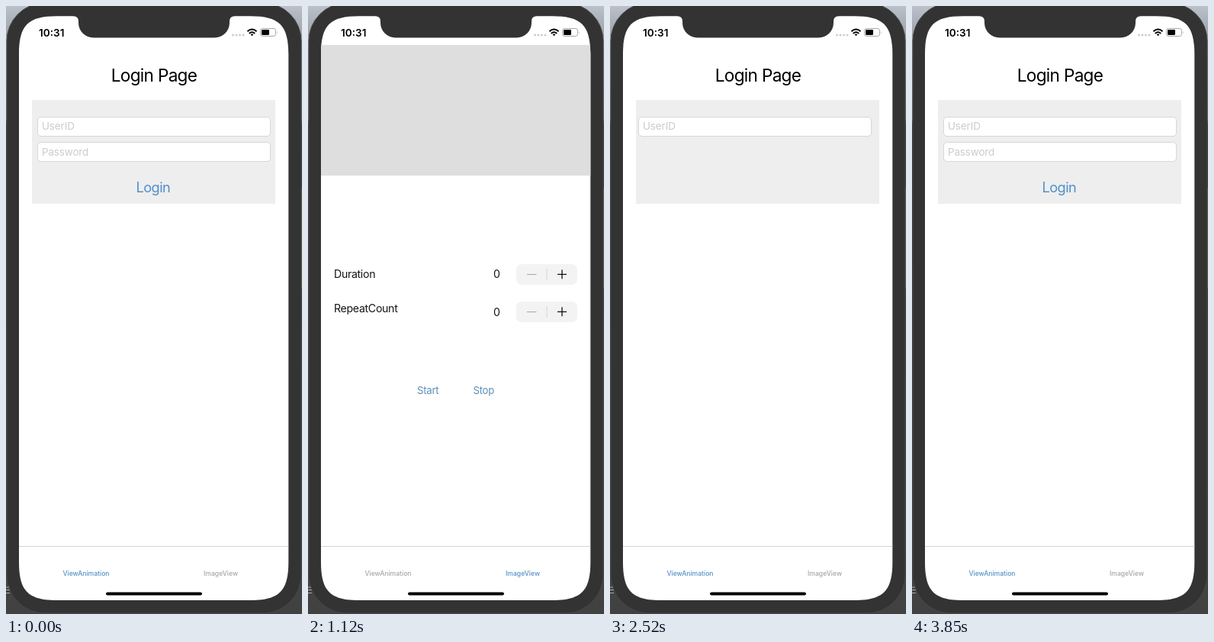
Write an HTML page that moves like this. It is 388 by 796 pixels and loops after 3.92 s.

```html
<!DOCTYPE html>
<html lang="en">
<head>
<meta charset="utf-8">
<title>Login page and tab animation</title>
<style>
  html, body { margin: 0; width: 100%; height: 100%; overflow: hidden; background: #3a3a3a; }
  svg { display: block; width: 388px; height: 796px; }
  text { font-family: Inter, Roboto, "Liberation Sans", sans-serif; }
  .title { font-size: 22.6px; letter-spacing: -.031em; text-anchor: middle; }
  .hint { font-size: 13.4px; letter-spacing: -.008em; fill: #cbcbcd; }
  .field rect { fill: #fff; stroke: #d6d6d6; }
  .login { font-size: 18.2px; letter-spacing: -.033em; fill: #4f8fcc; }
  .label { font-size: 14.2px; letter-spacing: -.024em; fill: #151515; }
  .button { font-size: 13.2px; letter-spacing: -.02em; fill: #5a8fb8; }
  .tab { font-size: 8.6px; font-weight: 500; text-anchor: middle; }
  .clock { font-size: 13.6px; font-weight: 600; }
</style>
</head>
<body>
<svg viewBox="0 0 388 796">
  <defs>
    <linearGradient id="desk" x2="0" y2="1">
      <stop offset="0" stop-color="#bac1ca"/>
      <stop offset=".06" stop-color="#989ca2"/>
      <stop offset=".185" stop-color="#85888c"/>
      <stop offset=".195" stop-color="#3c3c3c"/>
      <stop offset=".8" stop-color="#4a4a4a"/>
      <stop offset="1" stop-color="#414141"/>
    </linearGradient>
    <path id="glass" d="M67 13.300H88Q95 13.300 95 20V22A19.500 19.500 0 0 0 114.500 41.500H273.500A19.500 19.500 0 0 0 293 22V20Q293 13.300 300 13.300H320C358 13.300 370.300 25 370.300 63V728C370.300 766 358 778 320 778H67C29 778 17 766 17 728V63C17 25 29 13.300 67 13.300Z"/>
    <clipPath id="screen"><use href="#glass"/></clipPath>
    <g id="stepper">
      <rect x="273" width="80" height="27" rx="7" fill="#f3f3f4"/>
      <path d="M287 13.500h12.500" stroke="#a6a6a6" stroke-width="1.2"/>
      <path d="M313 6v15" stroke="#d6d6d8"/>
      <path d="M327 13.300h12M333 7.300v12" stroke="#111" stroke-width="1.3"/>
    </g>
  </defs>

  <!-- desktop and phone body -->
  <rect width="388" height="796" fill="url(#desk)"/>
  <rect x="386" y="238" width="2" height="132" fill="#6f7551"/>
  <rect x="1" y="-4" width="386" height="799" rx="50" fill="#333" stroke="#484848"/>
  <path d="M0 761h4M0 764.500h5M0 768.500h5" stroke="#aaa"/>
  <use href="#glass" fill="#fff"/>

  <g clip-path="url(#screen)">
    <g id="loginPage">
      <text class="title" x="194" y="99">Login Page</text>
      <rect x="34" y="123" width="319" height="136" fill="#eee"/>
      <g id="user" class="field">
        <rect x="41.500" y="145.500" width="305" height="25" rx="4.500"/>
        <text class="hint" x="47" y="162">UserID</text>
      </g>
      <g id="pass" class="field">
        <rect x="41.500" y="178.500" width="305" height="25" rx="4.500"/>
        <text class="hint" x="47" y="195.500">Password</text>
      </g>
      <text id="login" class="login" x="170.600" y="244">Login</text>
    </g>

    <g id="imagePage">
      <rect x="17" y="51" width="354" height="171" fill="#dedede"/>
      <g class="label">
        <text x="34" y="356">Duration</text>
        <text x="34" y="401">RepeatCount</text>
        <text x="243" y="356">0</text>
        <text x="243" y="406">0</text>
      </g>
      <use href="#stepper" y="338"/>
      <use href="#stepper" y="387"/>
      <text class="button" x="143" y="508">Start</text>
      <text class="button" x="216.500" y="508">Stop</text>
    </g>

    <path d="M17 707.500H371" stroke="#d4d4d4"/>
    <text id="tabA" class="tab" x="105" y="746">ViewAnimation</text>
    <text id="tabB" class="tab" x="281.500" y="746">ImageView</text>
    <circle id="touch" r="17" fill="#dadada" fill-opacity=".92" stroke="#999"/>
    <rect x="131" y="767.500" width="126" height="4" rx="2"/>
  </g>

  <!-- status bar -->
  <text class="clock" x="43" y="39.500">10:31</text>
  <path d="M297.500 38h15" stroke="#ccc" stroke-width="3" stroke-linecap="round" stroke-dasharray="0 4.500"/>
  <g fill="none" stroke="#000" stroke-width="2">
    <path d="M316.500 33.300Q322.500 27.700 328.500 33.300M318.800 36Q322.500 32.600 326.200 36"/>
    <path d="M320.700 37.200Q322.500 35.700 324.300 37.200L322.500 39.300Z" fill="#000" stroke="none"/>
  </g>
  <rect x="333.500" y="29.500" width="20" height="10" rx="2.800" fill="none" stroke="#a5a5a5"/>
  <rect x="335" y="31" width="10" height="7" rx="1.300"/>
  <path d="M355 33v3.300q1.400-1.600 0-3.300" fill="#a5a5a5"/>
</svg>

<script>
const LOOP = 3920, STEP = 70, WIDTH = 354;
const TO_IMAGE = 1120, TO_LOGIN = 1960;
const BLUE = '#5591c8', GRAY = '#a6a6a6';
const $ = id => document.getElementById(id);
const clamp = v => Math.min(1, Math.max(0, v));

// Distance still to travel, as a share of the screen width
const easeLeft = (t, start) => (1 + Math.cos(Math.PI * clamp((t - start) / 457))) / 2;
const springLeft = (t, start) => {
  const k = Math.max(0, t - start) * .012;
  return t < 3840 ? (1 + k) * Math.exp(-k) : 0;
};

const shift = (id, left) => $(id).setAttribute('transform', `translate(${-WIDTH * left} 0)`);
const show = (id, on) => $(id).setAttribute('visibility', on ? 'visible' : 'hidden');

function press(t) {
  const [x, y, start, end] = t < TO_IMAGE ? [288.5, 748, 840, TO_IMAGE] : [106.5, 742, 1680, TO_LOGIN];
  const touch = $('touch');
  touch.setAttribute('cx', x);
  touch.setAttribute('cy', y);
  touch.setAttribute('opacity', t >= start && t < end ? clamp(.4 + (t - start) / 350) : 0);
}

function draw(now) {
  const t = Math.floor(now % LOOP / STEP) * STEP;
  const image = t >= TO_IMAGE && t < TO_LOGIN;
  const entering = t >= TO_LOGIN;
  show('loginPage', !image);
  show('imagePage', image);
  $('tabA').setAttribute('fill', image ? GRAY : BLUE);
  $('tabB').setAttribute('fill', image ? BLUE : GRAY);
  shift('user', entering ? easeLeft(t, 2094) : 0);
  shift('pass', entering ? easeLeft(t, 2584) : 0);
  shift('login', entering ? springLeft(t, 3198) : 0);
  press(t);
}

const begin = performance.now();
function tick() {
  draw(performance.now() - begin);
  requestAnimationFrame(tick);
}
tick();
</script>
</body>
</html>
```
